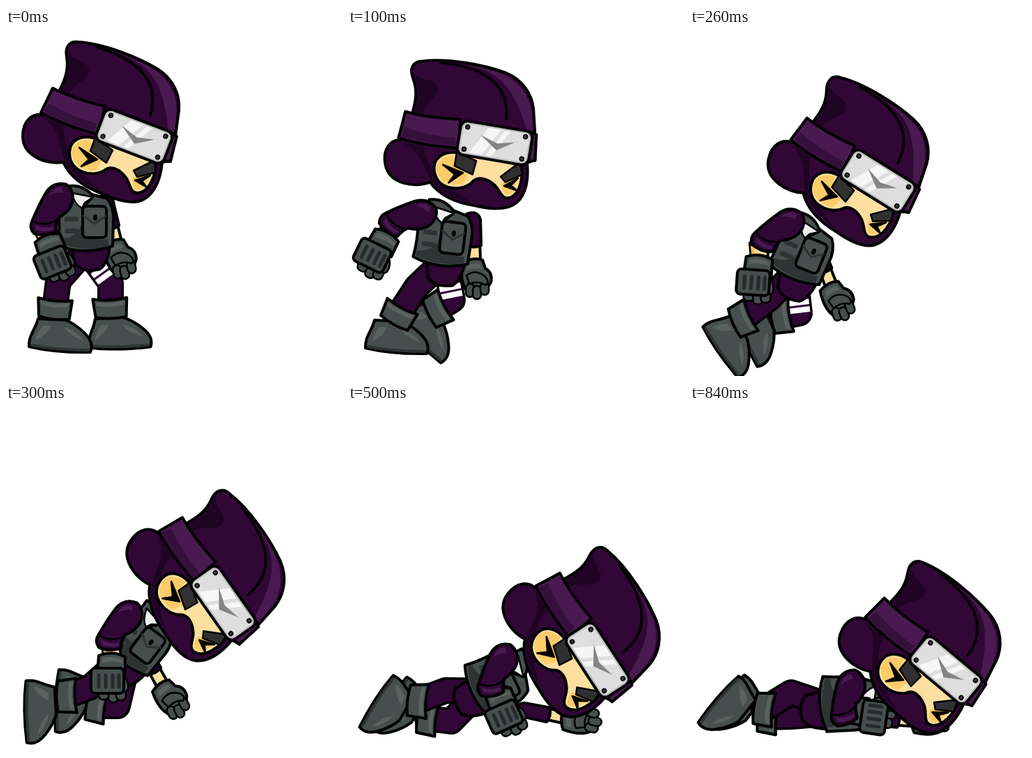
An HTML page that plays this animation: 482 px wide and 498 px high, repeating every 1000 ms.

```html
<!DOCTYPE html>
<html lang="en">
<head>
<meta charset="utf-8">
<title>Falling ninja</title>
<style>
  html, body { margin: 0; width: 100%; height: 100%; overflow: hidden; background: #fff; }
  svg { display: block; width: 482px; height: 498px; }
  path, rect, ellipse, circle { stroke-linejoin: round; stroke-linecap: round; }
  .ink { stroke: #000; stroke-width: 4; }
  .thin { stroke: #000; stroke-width: 2.5; }
  .cloth { fill: #300735; }
  .light { fill: #491a50; }
  .shade { fill: #1f0424; }
  .steel { fill: #464f4d; }
  .pale { fill: #59625f; }
  .dark { fill: #2d3433; }
  .skin { fill: #fddfa0; }
  .leg path { fill: none; }
  .leg .edge { stroke: #000; stroke-width: 38; }
  .leg .fill { stroke: #300735; stroke-width: 31; }
  .leg .band { stroke: #fff; stroke-width: 31; stroke-linecap: butt; stroke-dasharray: 0 12 8 3 8 99; }
</style>
</head>
<body>
<svg viewBox="0 0 482 498">
  <defs>
    <g id="foot">
      <path class="steel ink" d="M-22 -2C-26 14-36 22-35 38Q4 47 53 46Q59 32 44 18Q32 6 18 0Z"/>
      <path class="pale" d="M-15 8Q-24 18-26 29Q-8 20-4 8ZM16 10Q34 16 44 30Q22 22 16 10Z"/>
      <path d="M-31 36Q6 43 50 43" fill="none" stroke="#2d3433" stroke-width="4"/>
    </g>
    <g id="cuff">
      <path class="steel ink" d="M-25-14Q0-9 24-14L22 13Q0 17-22 12Z"/>
      <path class="pale" d="M-21-10Q0-5 20-10L19-4Q0 0-20-4Z"/>
    </g>
  </defs>

  <!-- data-pose: x y angle for each pose in turn -->
  <g class="leg" data-hip="0 55" data-to="farCuff"
     data-knee="150 365,150 389,157 408,160 432,148 448,148 454,145 447">
    <path class="edge"/><path class="fill"/><path class="band"/>
  </g>
  <use href="#foot" data-pose="150 416 -6,122 410 40,112 416 62,115 414 88,110 440 115,100 440 120,90 438 124"/>
  <use href="#cuff" id="farCuff" data-pose="150 401 -3,128 403 62,131 413 80,130 432 100,128 443 105,114 450 98,112 448 97"/>

  <g class="leg" data-hip="-20 48" data-to="nearCuff"
     data-knee="75 362,99 370,113 388,121 405,132 402,140 410,145 413">
    <path class="edge"/><path class="fill"/>
  </g>
  <use href="#foot" data-pose="68 418 0,60 420 0,70 430 50,70 427 84,77 430 108,82 437 118,80 440 126"/>
  <use href="#cuff" id="nearCuff" data-pose="70 402 5,72 411 28,75 417 65,87 418 88,93 415 98,100 425 95,106 437 97"/>

  <!-- far arm -->
  <g data-pose="165 330 -12,184 358 0,213 390 -20,238 422 -28,283 443 -42,334 451 -78,345 452 -86">
    <path class="skin ink" d="M-11-55H5L6-24H-11Z"/>
    <path class="cloth ink" d="M-14-92Q2-98 6-84L7-47Q-4-42-14-47Z"/>
    <path class="steel ink" d="M-20-22Q-4-31 9-26L13-14Q24-8 21 6L12 20-14 18Q-24 4-20-22Z"/>
    <path class="pale" d="M-14-18Q-3-23 5-20L7-14Q-4-15-14-11Z"/>
    <g class="steel thin">
      <rect x="-15" y="8" width="12" height="19" rx="6"/>
      <rect x="-5" y="11" width="12" height="19" rx="6"/>
      <rect x="6" y="6" width="12" height="18" rx="6"/>
      <path d="M-14-4Q0-14 13-2Q20 6 13 10Q4 3-10 8Z"/>
    </g>
  </g>

  <!-- torso -->
  <g id="torso" data-pose="127 278 0,150 301 7,174 326 22,203 346 37,218 379 50,220 408 65,228 440 85">
    <path class="cloth ink" d="M-34 30L22 32Q20 58 8 67Q-16 73-28 60Z"/>
    <path class="steel ink" d="M-40-51Q-20-56-4-40L18-34Q29-20 27 0L26 34Q-16 48-53 33Q-49 8-52-18Q-38-28-40-51Z"/>
    <path class="dark" d="M-22-36Q-12-4-24 14Q-36 24-49 23L-50 30Q-16 43 20 34L20 24Q-12 28-14 8Z"/>
    <path d="M-33-42L-2-36-18-20Q-29-26-33-42Z" fill="#eee" class="thin"/>
    <path class="thin" d="M-2-36L-18-20-14-28Z" fill="#bbb"/>
    <rect class="dark" x="-43" y="-8" width="20" height="7" rx="3"/>
    <rect class="dark" x="-43" y="9" width="20" height="7" rx="3"/>
    <rect class="steel ink" x="-17" y="-23" width="34" height="45" rx="6"/>
    <path d="M-16-9L0 2 16-9" fill="none" stroke="#2d3433" stroke-width="3"/>
    <ellipse cx="1" cy="-7" rx="3" ry="4.5"/>
  </g>

  <!-- near arm -->
  <g data-pose="68 335 -22,36 326 26,92 364 4,147 396 0,186 421 1,225 447 -24,264 447 -82">
    <path class="skin ink" d="M-10-56L17-56 17-30-6-30Z"/>
    <path d="M-6-50L-3-34" stroke="#f5b955" stroke-width="5"/>
    <path class="steel ink" d="M-14-36Q6-44 24-34L24-10-16-10Z"/>
    <path class="pale" d="M-9-32Q6-37 20-30L20-25Q4-30-10-25Z"/>
    <g class="steel thin">
      <rect x="-14" y="9" width="15" height="18" rx="6"/>
      <rect x="0" y="11" width="14" height="20" rx="6"/>
      <rect x="11" y="8" width="14" height="20" rx="6"/>
      <path d="M18-10Q30-2 28 12Q24 19 17 12Z"/>
    </g>
    <rect class="steel ink" x="-25" y="-18" width="47" height="36" rx="6"/>
    <path d="M-14-8V9M-4-8V9M6-8V9M15-8V9" stroke="#242b2a" stroke-width="5"/>
  </g>
  <g data-pose="75 243 0,105 265 42,142 278 25,174 302 7,206 334 4,222 364 -5,230 402 -16">
    <path class="cloth ink" d="M12-19Q-7-24-18-7Q-28 10-38 34Q-42 43-35 51Q-18 56-3 48Q-4 38 0 29Q22 16 21-2Q20-13 12-19Z"/>
    <path class="light" d="M5-15Q-8-16-14-2Q-4-9 7-7ZM-33 39Q-20 45-7 41L-7 46Q-20 50-32 46Z"/>
    <path d="M-36 34Q-18 42-1 31" fill="none" class="thin"/>
  </g>

  <!-- head -->
  <g data-pose="184 155 0,210.5 164.5 -11.2,269.5 219 11,311.5 285 34,338.5 343 46,358 366.5 36,367 381 19">
    <g transform="translate(-184 -155)">
      <path class="cloth ink" d="M66 88L76 91C85 73 90 60 87 42C84 26 92 18 104 20C140 22 190 42 218 59C240 73 250 96 248 118L243 155 236 190 224 192C222 215 214 236 198 245C182 254 158 246 140 238C112 228 92 214 82 192C60 196 24 184 24 155C24 132 38 122 52 124Z"/>
      <path class="shade" d="M89 33C98 50 117 46 119 60C121 75 96 78 91 94L79 91C90 70 93 50 89 33ZM53 128Q74 142 78 168L84 190Q95 214 137 234Q104 206 95 186Q80 160 84 140Z"/>
      <path class="light" d="M162 37C208 53 226 78 233 146L241 149C249 110 245 86 216 62Q192 46 162 37Z"/>
      <path d="M130 27C186 44 222 74 207 125" fill="none" stroke="#000" stroke-width="3.5"/>
      <path class="skin ink" d="M91 178C92 160 108 152 128 158L214 190C217 207 206 236 188 236C178 236 178 222 172 214C163 202 150 196 141 204C126 214 91 208 91 178Z"/>
      <path d="M94 178Q97 159 122 160L122 174 138 190 128 204Q97 203 94 178ZM181 214L207 209Q200 232 188 232Q181 230 181 214Z" fill="#fdcb68"/>
      <path class="thin" d="M128 157L153 175 144 193 121 176ZM183 204L214 189 214 207 188 213Z" fill="#303032"/>
      <path d="M105 171L131 188 108 198 119 188ZM207 211L185 218 202 228 195 219Z" class="thin"/>
      <path class="light ink" d="M67 86Q98 102 142 112L132 152Q84 140 50 121ZM236 149L245 155 236 191 224 190Z"/>
      <path d="M62 108Q92 126 130 137L128 148Q86 138 55 120Z" fill="#36103c"/>
      <g transform="translate(184 155) rotate(20.8)">
        <rect class="ink" x="-52" y="-24.5" width="104" height="49" rx="10" fill="#bdbdbd"/>
        <rect x="-48" y="-20.5" width="96" height="41" rx="7" fill="#dedede"/>
        <path d="M-12-20H6L-16 20H-34ZM12-20H20L-2 20H-10Z" fill="#f6f6f6"/>
        <path d="M-22-8L4 0 29-6 4 10Z" fill="#858585"/>
        <g fill="#333" stroke="#000" stroke-width="1.5">
          <circle cx="-42" cy="-16" r="3"/><circle cx="42" cy="-16" r="3"/>
          <circle cx="-42" cy="16" r="3"/><circle cx="42" cy="16" r="3"/>
        </g>
      </g>
    </g>
  </g>
</svg>
<script>
  const LOOP = 1000, STEP = 100, POSES = 7;
  const parse = text => text.split(',').map(pose => pose.split(' ').map(Number));
  const all = selector => [...document.querySelectorAll(selector)];

  const parts = all('[data-pose]').map(node => ({ node, poses: parse(node.dataset.pose) }));
  const posesOf = id => parts.find(part => part.node.id === id).poses;
  const torso = posesOf('torso');
  const legs = all('.leg').map(({ dataset, children }) => ({
    paths: [...children],
    hip: parse(dataset.hip)[0],
    knees: parse(dataset.knee),
    ankles: posesOf(dataset.to)
  }));

  // Moves a point from a part's own space onto the stage.
  function place([px, py], [x, y, angle]) {
    const a = angle * Math.PI / 180, c = Math.cos(a), s = Math.sin(a);
    return [x + px * c - py * s, y + px * s + py * c];
  }

  function show(i) {
    for (const { node, poses } of parts) {
      const [x, y, angle] = poses[i];
      node.setAttribute('transform', `translate(${x} ${y}) rotate(${angle})`);
    }
    for (const { paths, hip, knees, ankles } of legs) {
      const [x, y] = ankles[i];
      const d = `M${place(hip, torso[i])}L${knees[i]}L${x},${y}`;
      for (const path of paths) {
        path.setAttribute('d', d);
        if (path.matches('.band')) path.style.opacity = i < 3 ? 1 : 0;
      }
    }
  }

  function tick() {
    const time = performance.now() % LOOP;
    show(Math.min(POSES - 1, Math.floor(time / STEP)));
    requestAnimationFrame(tick);
  }
  tick();
</script>
</body>
</html>
```
